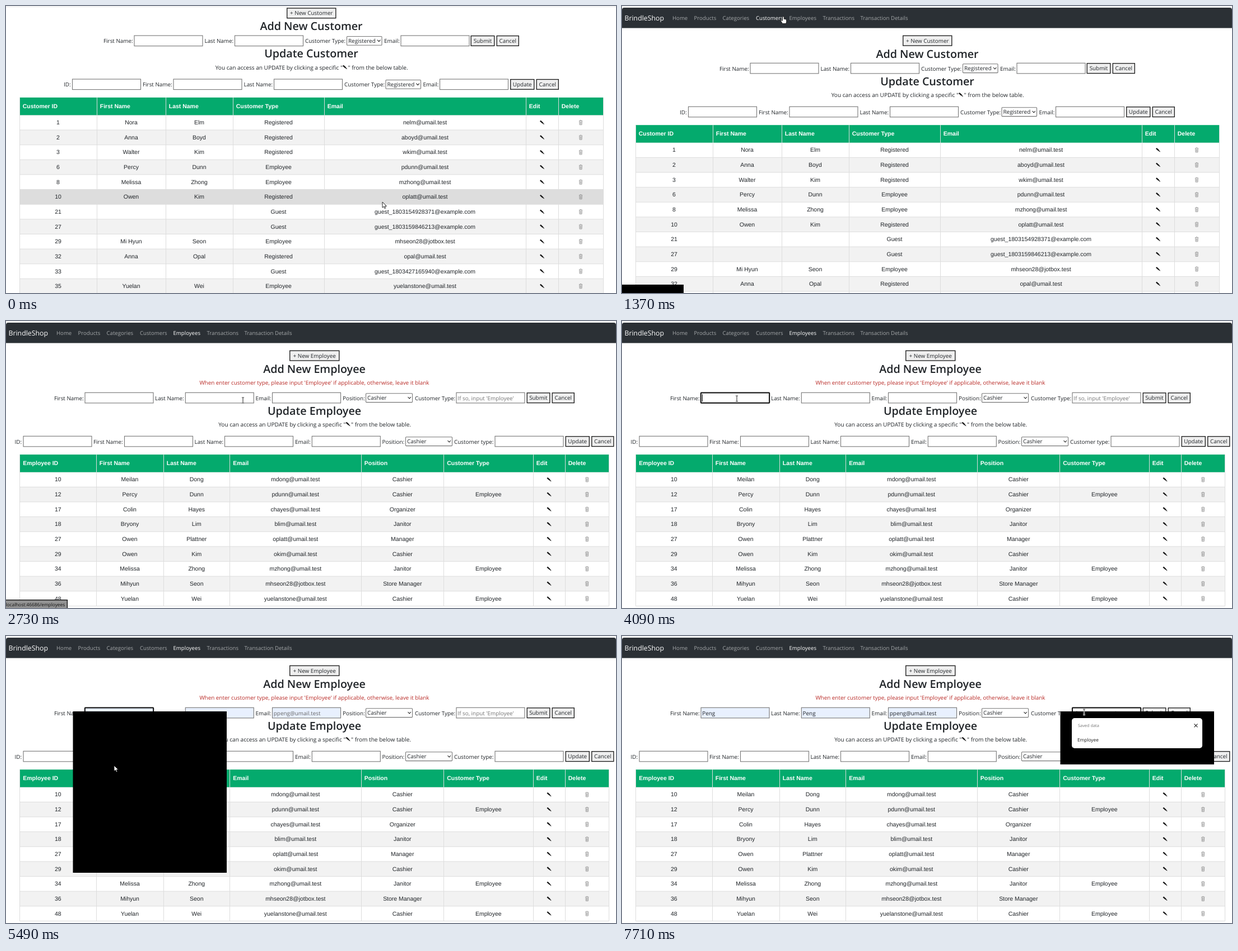
Animation of 1089 by 514 pixels, one loop 8 s. Source, as an HTML page:

```html
<!DOCTYPE html>
<html lang="en">
<head>
<meta charset="utf-8">
<title>Customer and employee admin</title>
<style>
html, body { margin: 0; width: 100%; height: 100%; overflow: hidden; background: #fff; }
svg { display: block; width: 1089px; height: 514px; text-rendering: geometricPrecision; }
text { font: 9.9px "Open Sans", "Noto Sans", sans-serif; fill: #212529; white-space: pre; }
text.m { text-anchor: middle; }
text.e { text-anchor: end; }
text.h { font-size: 19.7px; font-weight: 600; }
text.tip { font-size: 10.1px; }
text.nav { font-size: 9.65px; fill: #a3a6a8; }
text.brand { font-size: 12.3px; fill: #fff; }
text.cell { font: 10.47px "Liberation Sans", Arial, sans-serif; }
text.th { font-weight: bold; fill: #fff; }
text.warn { fill: #b92b27; }
text.hint { fill: #757575; }
text.pop { font-size: 8.3px; fill: #1b1b1b; }
text.mail { font-size: 8.1px; }
text.name { font-size: 8px; font-weight: bold; fill: #000; }
text.small { font-size: 7.4px; fill: #767676; }
.field { fill: #fff; stroke: #767676; stroke-width: 1.1; }
.btn { fill: #efefef; stroke: #161616; stroke-width: 1.3; }
.line { fill: none; stroke: #222; stroke-width: 1.1; }
.focus { fill: none; stroke: #101010; stroke-width: 2; }
</style>
</head>
<body>
<svg id="stage" viewBox="0 0 1089 514">
  <defs>
    <g id="pencil">
      <path d="M-4-2.3-2.4-4 2.3.3.9 2Z" fill="#111"/>
      <path d="M1.2 2.2 2.5.7 4.2 3.6Z" fill="#111"/>
    </g>
    <g id="trash" fill="none" stroke="#888" stroke-width=".75">
      <path d="M-3-3.3H3M-1-4.1H1M-2.4-3-2 4H2L2.4-3M-.8-2V3M.8-2V3"/>
    </g>
  </defs>
</svg>
<script>
const LOOP = 8000, ROW = 26.64, SCROLL = 49.3;
const $ = id => document.getElementById(id);
const text = (x, y, s, cls = '', id = '') => `<text x="${x}" y="${y}" class="${cls}" id="${id}">${s}</text>`;
const box = (x, y, w, h, attrs) => `<rect x="${x}" y="${y}" width="${w}" height="${h}" ${attrs}/>`;
const path = (d, attrs = 'class="line"') => `<path d="${d}" ${attrs}/>`;
const icon = (name, x, y) => `<use href="#${name}" x="${x}" y="${y}"/>`;
const group = (id, body, attrs = '') => `<g id="${id}" ${attrs}>${body}</g>`;

const input = (x, y, id = '') => box(x + .5, y - 9.5, 122, 18.6, `class="field" id="${id}"`);
const button = (x, y, w, s) =>
  box(x + .7, y - 8.8, w - 1.4, 17.8, 'class="btn"') + text(x + w / 2, y + 3.8, s, 'm');
const select = (x, y, w, s) =>
  box(x + .5, y - 7.8, w - 1, 15.8, 'class="field" rx="1"') + text(x + 3, y + 3.7, s) +
  path(`M${x + w - 8.5} ${y - 1.6}l2.7 2.9 2.7-2.9`, 'class="line" stroke-width="1.4"');
const labels = (y, list) => list.map(([x, s]) => text(x, y + 3.8, s)).join('');
const heading = (cx, y, s) => text(cx, y, s, 'm h');

const hint = (cx, y) =>
  text(cx + 56, y, 'You can access an UPDATE by clicking a specific "', 'e tip') +
  icon('pencil', cx + 60, y - 4) + text(cx + 65.5, y, '" from the below table.', 'tip');

function table(cols, y, heads, rows) {
  const x0 = cols[0], x1 = cols[cols.length - 1], top = y + 31.5;
  const bottom = top + ROW * rows.length;
  const mid = i => (cols[i] + cols[i + 1]) / 2;
  let out = '';
  rows.forEach((row, i) => {
    const ry = top + i * ROW;
    out += box(x0, ry, x1 - x0, ROW, `class="row" fill="${i % 2 ? '#f2f2f2' : '#fff'}"`);
  });
  for (let i = 0; i <= rows.length; i++) out += path(`M${x0} ${top + i * ROW}H${x1}`, 'stroke="#ddd"');
  out += box(x0, y, x1 - x0, 31.5, 'fill="#04aa6d"');
  cols.forEach(x => out += path(`M${Math.floor(x) + .5} ${y}V${bottom}`, 'stroke="#ddd"'));
  heads.split('|').forEach((s, i) => out += text(cols[i] + 5.8, y + 18.8, s, 'cell th'));
  rows.forEach((row, i) => {
    const cy = top + (i + .5) * ROW;
    row.replace('@u', '@umail.test').replace('@x', '@example.com').split('|')
      .forEach((s, c) => out += text(mid(c), cy + 3.4, s, 'cell m'));
    out += icon('pencil', mid(cols.length - 3), cy) + icon('trash', mid(cols.length - 2), cy);
  });
  return out;
}

const links = [[90, 'Home'], [128.5, 'Products'], [179.5, 'Categories'], [239, 'Customers'],
  [298.5, 'Employees'], [358.5, 'Transactions'], [425.5, 'Transaction Details']];
const nav = path('M0 39.5V7Q0 3 4 3H1085Q1089 3 1089 7V39.5Z', 'fill="#2b3035"') +
  text(4.5, 26, 'BrindleShop', 'brand') +
  links.map(([x, s]) => text(x, 25, s, 'nav', s)).join('');

const customers =
  button(501, 62, 88.5, '+ New Customer') + heading(545, 92.5, 'Add New Customer') +
  labels(111.8, [[174, 'First Name:'], [354.5, 'Last Name:'], [534, 'Customer Type:'], [675, 'Email:']]) +
  [228.5, 408, 704.5].map(x => input(x, 111.8)).join('') + select(608, 111.6, 63.5, 'Registered') +
  button(829.5, 111.6, 43, 'Submit') + button(875.5, 111.6, 40.5, 'Cancel') +
  heading(545, 141.5, 'Update Customer') + hint(545, 163) +
  labels(189.8, [[103, 'ID:'], [244, 'First Name:'], [424.5, 'Last Name:'], [604, 'Customer Type:'], [744.5, 'Email:']]) +
  [118, 298.5, 478, 774].map(x => input(x, 189.8)).join('') + select(677.5, 189.6, 63.5, 'Registered') +
  button(900, 189.6, 43.5, 'Update') + button(946.5, 189.6, 40.5, 'Cancel') +
  table([24, 162, 285, 405, 568, 928, 986, 1066], 213.2,
    'Customer ID|First Name|Last Name|Customer Type|Email|Edit|Delete', [
      '1|Nora|Elm|Registered|nelm@u',
      '2|Anna|Boyd|Registered|aboyd@u',
      '3|Walter|Kim|Registered|wkim@u',
      '6|Percy|Dunn|Employee|pdunn@u',
      '8|Melissa|Zhong|Employee|mzhong@u',
      '10|Owen|Kim|Registered|oplatt@u',
      '21|||Guest|guest_1803154928371@x',
      '27|||Guest|guest_1803159846213@x',
      '29|Mi Hyun|Seon|Employee|mhseon28@jotbox.test',
      '32|Anna|Opal|Registered|opal@u',
      '33|||Guest|guest_1803427165940@x',
      '35|Yuelan|Wei|Employee|yuelanstone@u']);

const employees =
  button(506, 62, 89.5, '+ New Employee') + heading(550.5, 92.5, 'Add New Employee') +
  text(550.5, 113.6, "When enter customer type, please input 'Employee' if applicable, otherwise, leave it blank", 'm warn') +
  labels(137.8, [[86, 'First Name:'], [266, 'Last Name:'], [445.5, 'Email:'], [601, 'Position:'], [730, 'Customer Type:']]) +
  [[140.5, 'first'], [319.8, 'last'], [475, 'mail'], [803.5, 'type']].map(([x, id]) =>
    input(x, 137.8, id) + text(x + 2.8, 141.6, '', '', id + 'Text')).join('') +
  text(806.3, 141.6, "If so, input 'Employee'", 'hint') +
  select(642, 137.6, 84, 'Cashier') + button(929.5, 137.6, 42, 'Submit') + button(974.5, 137.6, 40.5, 'Cancel') +
  box(140.8, 128.6, 122.4, 18.2, 'class="focus" rx="1" id="ring"') +
  path('M0 131.3V144.3', 'stroke="#000" id="caret"') +
  heading(550.5, 167.5, 'Update Employee') + hint(550.5, 188.8) +
  labels(215.8, [[15.5, 'ID:'], [156, 'First Name:'], [336.5, 'Last Name:'], [516, 'Email:'], [671.5, 'Position:'], [800, 'Customer type:']]) +
  [30.5, 211, 390, 545.8, 872.5].map(x => input(x, 215.8)).join('') +
  select(713, 215.6, 84, 'Cashier') + button(998.5, 215.6, 43.5, 'Update') + button(1045, 215.6, 40.5, 'Cancel') +
  table([24.5, 161, 281, 399.5, 634, 781.5, 941, 998, 1076.5], 239.2,
    'Employee ID|First Name|Last Name|Email|Position|Customer Type|Edit|Delete', [
      '10|Meilan|Dong|mdong@u|Cashier',
      '12|Percy|Dunn|pdunn@u|Cashier|Employee',
      '17|Colin|Hayes|chayes@u|Organizer',
      '18|Bryony|Lim|blim@u|Janitor',
      '27|Owen|Plattner|oplatt@u|Manager',
      '29|Owen|Kim|okim@u|Cashier',
      '34|Melissa|Zhong|mzhong@u|Janitor|Employee',
      '36|Mihyun|Seon|mhseon28@jotbox.test|Store Manager',
      '48|Yuelan|Wei|yuelanstone@u|Cashier|Employee']);

const people = ['Yuelan Wei|yuelanstone', 'Peng Peng|ppeng', 'Meilan Dong|mdong', 'Owen Kim|oplatt', 'Owen Plattner|']
  .map(s => s.split('|'));
const cross = (x, y) => path(`M${x - 3} ${y - 3}l6 6m0-6l-6 6`);

const listPanel =
  box(140, 147, 233, 248, 'rx="5" fill="#fff"') +
  text(149, 163, "Type '/' to search from your saved info", 'small') + cross(361.7, 160.3) +
  box(144, 173, 213, 41.5, 'id="pick" fill="#e0eef8" stroke="#6fa8d2" rx="1"') +
  people.map(([name, mail], i) => text(150, 189.2 + 42 * i, name, 'name') +
    (mail ? text(150, 203.8 + 42 * i, mail + '@umail.test', 'pop mail') : '')).join('') +
  box(362.3, 183.5, 8.6, 77, 'rx="4.3" fill="#8b8b8b"') +
  path('M364 177.5l2.6-2.6 2.6 2.6M364 355.8l2.6 2.6 2.6-2.6') +
  path('M140 363.5H373', 'stroke="#e2e2e2"') +
  '<circle cx="153.8" cy="376.8" r="2.4" class="line"/>' + path('M154.5 384H150.5Q149.5 380.6 154 380.8') +
  box(155.5, 380, 4.4, 4.4, 'rx="1" fill="#222"') +
  text(169, 383, 'Manage personal info', 'pop');

const savedPanel = box(803, 147, 233, 54, 'rx="5" fill="#fff"') +
  text(814, 163.2, 'Saved data', 'small') + cross(1024.5, 160.3) + text(813, 189, 'Employee', 'pop');

const cursors =
  group('arrow', path('M0 0V10.2L2.4 8 4 11.6 5.7 10.9 4.2 7.4H7.4Z', 'fill="#fff" stroke="#111" stroke-width=".9"')) +
  group('hand', path('M-1.3 6V-.6Q0-2 1.3-.6V3.2Q5.6 3.4 5.7 5.8V8.5L4.6 11.5H-1.4L-4.6 6.8Q-4.2 4.9-2.6 6Z',
    'fill="#fff" stroke="#111" stroke-width=".9"')) +
  group('beam', ['#fff" stroke-width="2.4', '#222" stroke-width="1'].map(s =>
    path('M-2-5H-.6L0-4.5.6-5H2M0-4.5V4.5M-2 5H-.6L0 4.5.6 5H2', `fill="none" stroke="${s}"`)).join(''));

$('stage').insertAdjacentHTML('beforeend',
  group('page', nav + group('customers', customers) + group('employees', employees)) +
  box(0, 0, 1089, 2.6, 'fill="#f4f4f4"') +
  group('status', box(0, 499, 110, 15, 'fill="#000"') +
    group('statusBody', box(0, 500.2, 108.8, 14, 'fill="#f4f4f4"') + text(-.5, 511, '', 'pop', 'url'))) +
  group('listPop', box(119.5, 135, 274.5, 289, 'fill="#000"') + group('listPanel', listPanel)) +
  group('savedPop', box(782.5, 135, 274.5, 95, 'fill="#000"') + group('savedPanel', savedPanel)) +
  group('cursor', cursors));

// Tables of [start ms, values...]; each entry holds until the next.
const moves = [
  [0, 672, 351, 'arrow'], [160, 610, 312, 'arrow'], [240, 490, 225, 'arrow'], [320, 380, 150, 'arrow'],
  [570, 345, 124, 'arrow'], [740, 333, 117, 'arrow'], [900, 320, 100, 'arrow'], [970, 311, 88, 'arrow'],
  [1120, 261, 33, 'arrow'], [1370, 288, 20, 'hand'], [1450, 318, 22, 'hand'], [1530, 339, 20, 'hand'],
  [1700, 326, 22, 'hand'], [1850, 321, 21, 'hand'], [2330, 333, 45, 'arrow'], [2410, 365, 83, 'arrow'],
  [2490, 402, 118, 'arrow'], [2660, 415, 132, 'beam'], [2730, 423, 142, 'beam'], [2980, 405, 143, 'beam'],
  [3140, 365, 146, 'beam'], [3290, 315, 155, 'arrow'], [3450, 260, 168, 'arrow'], [3600, 220, 176, 'arrow'],
  [3680, 208, 177, 'arrow'], [3750, 206, 160, 'arrow'], [3840, 205, 139, 'beam'], [5040, 205, 153, 'arrow'],
  [5140, 201, 185, 'arrow'], [5220, 196, 218, 'arrow'], [5300, 193, 232, 'arrow'], [5630, 250, 195, 'arrow'],
  [5720, 345, 150, 'arrow'], [5800, 450, 120, 'arrow'], [5880, 550, 104, 'arrow'], [5960, 640, 101, 'arrow'],
  [6040, 715, 110, 'arrow'], [6110, 770, 123, 'arrow'], [6190, 803, 136, 'beam'], [6270, 818, 142, 'beam'],
  [6440, 822, 146, 'beam'], [6510, 824, 141, 'beam'], [6750, 806, 140, 'beam'], [6830, 822, 140, 'beam'],
  [6980, 825, 138, 'beam'], [7150, 825, 136, 'beam']];
const scrolls = [[0, SCROLL], [810, 32], [900, 10], [970, 0]];
const fades = [[0, 0], [1450, .6], [1530, 1], [2660, .85], [2730, .6], [2900, .2]];
const blinks = [[0, 0], [3750, 1], [4330, 0], [4740, 1], [5300, 0], [5630, 1], [6040, 0], [6440, 1], [6980, 0], [7150, 1], [7710, 0]];
const picks = [[0, 0], [5220, 1]];

const at = (list, t) => list.reduce((last, e) => e[0] <= t ? e : last);
const show = (id, on) => $(id).style.display = on ? '' : 'none';
const within = (t, a, b) => t >= a && t < b;
const rows = [...$('customers').querySelectorAll('.row')];

function render(t) {
  const onEmployees = t >= 2180, scroll = at(scrolls, t)[1];
  const [, x, y, kind] = at(moves, t);
  $('page').setAttribute('transform', `translate(0 ${-scroll})`);
  show('customers', !onEmployees);
  show('employees', onEmployees);
  $('Customers').style.fill = onEmployees ? '' : '#fff';
  $('Employees').style.fill = onEmployees ? '#fff' : t >= 1450 ? '#cccecf' : '';

  const hovered = Math.floor((y + scroll - 244.7) / ROW);
  rows.forEach((row, i) => row.style.fill = i === hovered ? '#ddd' : '');

  show('status', within(t, 1370, 2980));
  $('statusBody').style.opacity = at(fades, t)[1];
  $('url').textContent = 'localhost:46686/' + (t < 1700 ? 'customers' : 'employees');

  const pick = at(picks, t)[1], preview = within(t, 5140, 5630), filled = t >= 5140;
  const [name, mail] = people[pick], [first, last] = name.split(' ');
  const values = { first, last, mail: mail + '@umail.test' };
  for (const id in values) {
    $(id).style.fill = filled ? '#e8f0fe' : '';
    $(id + 'Text').textContent = filled ? values[id] : '';
    $(id + 'Text').style.fill = preview ? '#666' : '';
  }
  $('pick').setAttribute('y', 173 + 42 * pick);

  const onType = t >= 7150;
  show('ring', t >= 3750);
  $('ring').setAttribute('x', onType ? 803.9 : 140.8);
  show('caret', at(blinks, t)[1]);
  $('caret').setAttribute('transform', `translate(${onType ? 806.5 : t >= 5630 ? 165.6 : 143.5} 0)`);

  show('listPop', within(t, 4330, 5630));
  show('listPanel', t < 5490);
  show('savedPop', onType);
  show('savedPanel', t >= 7330);

  ['arrow', 'hand', 'beam'].forEach(k => show(k, k === kind));
  $('cursor').setAttribute('transform', `translate(${x} ${y})`);
}

const start = performance.now();
function tick() {
  render((performance.now() - start) % LOOP);
  requestAnimationFrame(tick);
}
render(0);
requestAnimationFrame(tick);
</script>
</body>
</html>
```
